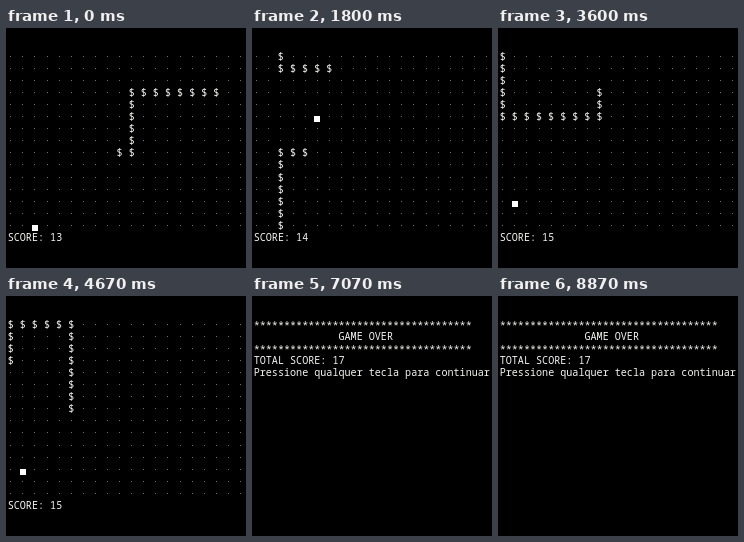
These frames come from a looping animation (240x240 px, 8990 ms). An HTML page:

```html
<!DOCTYPE html>
<html lang="pt">
<head>
<meta charset="utf-8">
<title>Snake</title>
<style>
  html, body { margin: 0; width: 100%; height: 100%; overflow: hidden; background: #000; }
  svg { display: block; width: 100vw; height: 100vh; }
  text { font: 10.1px "Noto Sans Mono", "DejaVu Sans Mono", monospace; fill: #f4f4f0; white-space: pre; }
</style>
</head>
<body>
<svg viewBox="0 0 240 240">
  <rect width="240" height="240"/>
  <g id="game">
    <g id="dots" fill="#747474"></g>
    <g id="snake"></g>
    <rect id="food" width="6" height="6" fill="#fff"/>
  </g>
  <g id="over"></g>
</svg>
<script>
const LOOP = 8990, FRAME = 1000 / 15, STEP = 94, PHASE = 40;
const COLS = 20, ROWS = 15, PITCH = 12.1, LEFT = 1.7, TOP = 28;
const START_LENGTH = 14, START_SCORE = 13;
const ROUTE = 'L7 D5 L8 D8 R6 D4 L8 U5 R5 D10 L4 D3 R4 U2 L4';
const DIRS = { L: [-1, 0], R: [1, 0], U: [0, -1], D: [0, 1] };
const FOODS = [[2, 14], [5, 5], [1, 12], [1, 11]];

const $ = id => document.getElementById(id);
const colX = c => LEFT + 3 + c * PITCH;
const rowY = r => TOP + r * PITCH;

function add(parent, tag, attrs, content = '') {
  const el = document.createElementNS('http://www.w3.org/2000/svg', tag);
  for (const key in attrs) el.setAttribute(key, attrs[key]);
  el.textContent = content;
  parent.appendChild(el);
  return el;
}

const write = (parent, row, content, dy = 3.5) =>
  add(parent, 'text', { x: LEFT, y: rowY(row) + dy }, content);

// The full trail of cells, wrapping at the board edges.
const trail = [[17, 3]];
for (const leg of ROUTE.split(' ')) {
  const [dx, dy] = DIRS[leg[0]];
  for (let n = +leg.slice(1); n > 0; n--) {
    const [c, r] = trail[trail.length - 1];
    trail.push([(c + dx + COLS) % COLS, (r + dy + ROWS) % ROWS]);
  }
}

const same = (a, b) => a[0] === b[0] && a[1] === b[1];
const lastStep = trail.length - START_LENGTH;

// Step at which the head reaches each meal.
const meals = [];
for (let s = 1; s <= lastStep; s++) {
  const food = FOODS[meals.length];
  if (food && same(trail[s + START_LENGTH - 1], food)) meals.push(s);
}

const dots = [];
for (let r = 0; r < ROWS; r++) {
  for (let c = 0; c < COLS; c++) {
    dots.push(add($('dots'), 'rect', {
      x: Math.round(colX(c) - 0.5), y: Math.round(rowY(r) - 0.5), width: 1, height: 1
    }));
  }
}

const links = Array.from({ length: START_LENGTH + FOODS.length }, () =>
  add($('snake'), 'text', { 'text-anchor': 'middle' }, '$'));
const score = write($('game'), 15, '');

const stars = '*'.repeat(36);
write($('over'), 0, stars, 5);
write($('over'), 1, ' '.repeat(14) + 'GAME OVER');
write($('over'), 2, stars, 5);
write($('over'), 3, 'TOTAL SCORE: ' + (START_SCORE + FOODS.length));
write($('over'), 4, 'Pressione qualquer tecla para continuar');

const show = (el, on) => el.setAttribute('display', on ? 'inline' : 'none');

function drawGame(step) {
  const eaten = meals.filter(m => m <= step).length;
  const length = START_LENGTH + meals.filter(m => m < step).length;
  const head = step + START_LENGTH - 1;
  const food = FOODS[eaten];
  const covered = new Set([food[1] * COLS + food[0]]);

  links.forEach((link, i) => {
    const cell = trail[head - i];
    const visible = i < length && !same(cell, food);
    show(link, visible);
    if (!visible) return;
    link.setAttribute('x', colX(cell[0]));
    link.setAttribute('y', rowY(cell[1]) + 3.5);
    covered.add(cell[1] * COLS + cell[0]);
  });
  dots.forEach((dot, i) => show(dot, !covered.has(i)));

  $('food').setAttribute('x', Math.round(colX(food[0]) - 3));
  $('food').setAttribute('y', Math.round(rowY(food[1]) - 0.5));
  score.textContent = 'SCORE: ' + (START_SCORE + eaten);
}

let shown = -1;
function render(time) {
  const tick = Math.floor((time % LOOP + 5) / FRAME);
  const step = Math.min(lastStep, Math.floor((tick * FRAME + PHASE) / STEP));
  if (step === shown) return;
  shown = step;
  const ended = step === lastStep;
  show($('game'), !ended);
  show($('over'), ended);
  if (!ended) drawGame(step);
}

const begin = performance.now();
function loop() {
  render(performance.now() - begin);
  requestAnimationFrame(loop);
}
loop();
</script>
</body>
</html>
```
